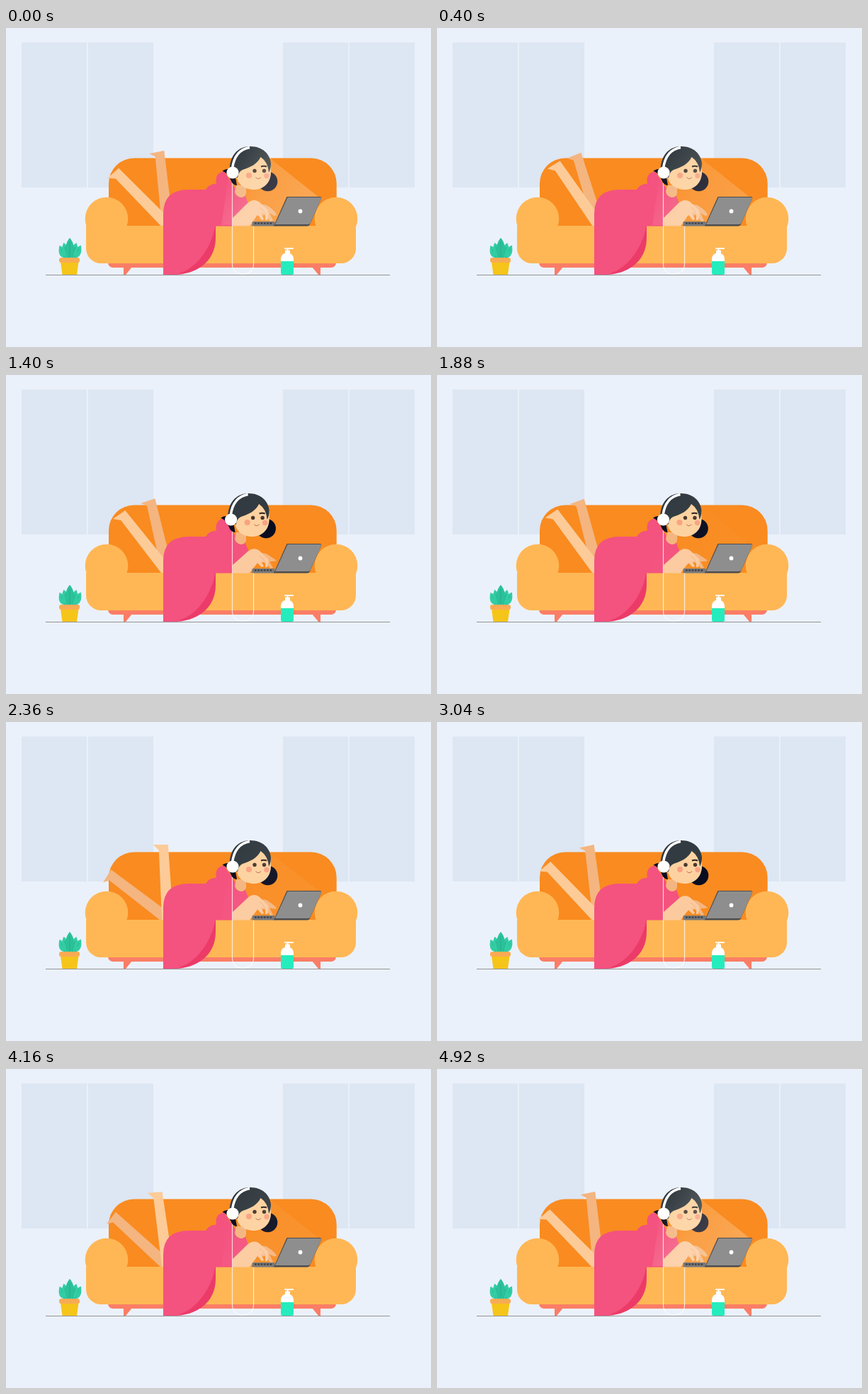
An HTML page with a canvas for the animation above (5000 ms loop, 600 by 450 pixels).

```html
<!DOCTYPE html>
<html lang="en">
<head>
<meta charset="utf-8">
<title>Sofa</title>
<style>
html, body { margin: 0; width: 100%; height: 100%; overflow: hidden; background: #ebf1fa; }
canvas { display: block; width: 600px; height: 450px; }
</style>
</head>
<body>
<canvas id="stage" width="600" height="450"></canvas>
<script>
const ctx = document.getElementById('stage').getContext('2d');
const LOOP = 5000, STEP = 40, LAST = 4920;

const PINK = '#f4527f', SKIN = '#fcca9f', SKIN_DARK = '#f4b580', FACE = '#fdd2a0';
const HAIR = '#323b41', NAVY = '#0a0d20', SEAT = '#ffb755';

function shape(d, color) {
  ctx.fillStyle = color;
  ctx.fill(new Path2D(d));
}
function line(d, color, width) {
  ctx.strokeStyle = color;
  ctx.lineWidth = width;
  ctx.stroke(new Path2D(d));
}
function disc(x, y, r, color) {
  ctx.fillStyle = color;
  ctx.beginPath();
  ctx.arc(x, y, r, 0, Math.PI * 2);
  ctx.fill();
}
function box(x, y, w, h, color, r = 0) {
  ctx.fillStyle = color;
  ctx.beginPath();
  ctx.roundRect(x, y, w, h, r);
  ctx.fill();
}
function at(x, y, degrees, draw) {
  ctx.save();
  ctx.translate(x, y);
  ctx.rotate(degrees * Math.PI / 180);
  draw();
  ctx.restore();
}

const mix = (a, b, k) => a + (b - a) * k;
const ease = k => (1 - Math.cos(Math.PI * k)) / 2;

// Eased interpolation through [time, value] keys.
function track(keys, t) {
  const i = Math.max(1, keys.findIndex(key => key[0] > t));
  const [t0, v0] = keys[i - 1], [t1, v1] = keys[i];
  return mix(v0, v1, ease((t - t0) / (t1 - t0)));
}

// The moments at which the legs turn round.
const swing = [-630, 130, 880, 1626, 2407, 3190, 3988, 4789, 5560]
  .map((time, i) => [time, i % 2 ? 0 : 1]);
const glowKeys = [[0, 1], [840, .45], [1400, 0], [2360, .22], [3040, 0], [4160, .28], [4920, 1], [5000, 1]];
const nodKeys = [[0, 0], [880, 0], [1440, 1], [2080, 0], [5000, 0]];

function room() {
  box(0, 0, 600, 450, '#ebf1fa');
  for (const x of [22, 391]) {
    box(x, 20.5, 186, 204.5, '#dde6f3');
    box(x + 92.3, 20, 1.3, 205, '#f1f5fb');
  }
}

function plant() {
  const leaves = [[84, -25, 20, 7], [96, 28, 21, 7], [87, -14, 23, 7], [93, 16, 23, 7], [90, 0, 29, 8]];
  for (const [x, angle, length, width] of leaves) {
    at(x, 325, angle, () => {
      shape(`M0 0C${-width} -5 ${-width} ${9 - length} 0 ${-length}C${width} ${9 - length} ${width} -5 0 0Z`,
        angle ? '#33cda4' : '#2cc199');
      line(`M0 0V${6 - length}`, '#1ba583', .6);
    });
  }
  shape('M77 330H102.500L100 348H79.500Z', '#f5c519');
  box(75, 324, 29, 7, '#f9ab54', 3);
}

function bottle() {
  box(388, 317.500, 18, 30.500, '#fff', [8, 8, 2.500, 2.500]);
  box(388, 329, 18, 19, '#25ecbd', [0, 0, 2.500, 2.500]);
  box(394, 313.500, 7, 5, '#fff', 1);
  box(396.500, 310, 2, 5, '#fff');
  box(393, 310, 13, 2, '#fff', 1);
}

function sofaFront() {
  box(144, 328, 322, 10, '#fb7d66', [0, 0, 7, 7]);
  shape('M166 337H178L169 348H166Z', '#fb7d66');
  shape('M432 337H444V348H441Z', '#fb7d66');
  disc(142, 269, 30.300, SEAT);
  disc(466, 269, 30.300, SEAT);
  box(113, 279, 381, 53, SEAT, [0, 0, 21, 21]);
}

function leg(angle, toe, color) {
  at(227, 278, angle - 91.1, () =>
    shape(`M2 -105L-19 ${toe}L-11 -97L-7 -1L-5 12H10L6 -46Z`, color));
}

function dress() {
  shape('M260 279H296V296C296 330 268 348 237 348Z', '#ec3b68');
  shape('M222 348V262Q222 228 258 228H282Q286 220 297 219.500Q294 205 308 202L327 232L338 237L343 250L320 269V279.500H295.500C290 310 268 343 237 348Z', PINK);
}

function arms(lift) {
  const drop = 2.5 - 2.5 * lift;
  shape('M325 222H339V233Q338 239 331 239Q324 237 323 231Z', SKIN_DARK);
  // far hand
  shape(`M352 ${252 + drop}Q364 ${246 + drop} 371 ${252 + drop}Q380 ${258 + drop} 382 ${264 - drop}L379 ${265 - drop}L372 ${261 + drop}L377 272L373 273L366 264L352 265Z`, SKIN_DARK);
  // near arm and hand
  const top = 241 + drop;
  shape(`M320 279.500V268L341 ${top + 6}Q349 ${top - 1} 357 ${top + 4}L369 ${top + 15}Q372 ${top + 19} 369 271L366 271V${top + 22}L360 ${top + 19}L364 270L361 271L355 ${top + 22}Q351 270 344 279.500Z`, SKIN);
  line(`M358 ${top + 12}Q364 ${top + 15} 366 ${top + 23}`, '#efad7b', .8);
}

function head(dx) {
  ctx.save();
  ctx.translate(dx, 0);
  disc(369.500, 216.500, 13.800, NAVY);
  shape('M305.500 201.500Q312 197 322 200L326 222Q320 222 317 214Q313 205 305.500 201.500Z', NAVY);
  shape('M325 191C330 180 345 176 359 179L374 191V203C374 219 363 228 350 228C335 228 325 219 325 204Z', FACE);
  shape('M316 210C313 186 323 167 345 167C362 167 373 178 374 191Q374 199 371 204Q370 189 359.500 182C355 192 344 197 334 200Q328 203 327 211Z', HAIR);
  line('M360 195.500Q364 194 368 195.500', '#29221f', 1.9);
  disc(351, 201.500, 2.700, '#48372f');
  disc(364.500, 201.500, 2.700, '#48372f');
  disc(343, 208, 4, '#f9a283');
  disc(368, 208.500, 3.700, '#f9a283');
  line('M352.500 210.500Q356 215 360 210.500', '#bd6b50', 1);
  line('M319.500 198Q323 172 344 168.500', '#fff', 3.5);
  disc(320, 204, 8.600, '#fff');
  ctx.restore();
}

function glow(level) {
  const light = ctx.createLinearGradient(412, 258, 314, 196);
  const tint = alpha => `rgba(255,244,228,${alpha * level})`;
  light.addColorStop(0, tint(.26));
  light.addColorStop(.5, tint(.19));
  light.addColorStop(1, tint(0));
  shape('M442 239L378 188Q362 167 345 167Q320 169 316 195L304 278H378L396 239Z', light);
}

function laptop() {
  box(347.500, 273, 32, 6.500, '#77787b', 1);
  for (let i = 0; i < 6; i++) box(351 + i * 4.3, 274.5, 2.6, 2, '#36383d');
  shape('M396.500 238H443Q446 238 445 241L429 277Q428 279.500 425 279.500H378Z', '#4b4c50');
  shape('M397.500 239H443.500Q446 239 445 241L429.500 275.500Q428.500 277 426 277H380Z', '#8e8e8e');
  disc(415.500, 258.500, 2.900, '#fff');
}

function render(t) {
  const sway = track(swing, t);
  room();
  line('M56 348.500H542', '#929397', 1.1);
  plant();
  box(145, 183.4, 321.7, 130, '#f98b20', [36, 36, 0, 0]);
  leg(mix(91.5, 41.1, sway), -102, SKIN_DARK);
  leg(mix(46.6, 91.4, sway), -105, '#fccb98');
  sofaFront();
  dress();
  arms((1 + Math.cos(t / 410 * Math.PI * 2)) / 2);
  line('M319.500 210V334Q320 346 334.500 347.500Q349 346 349.500 334V279', 'rgba(255,255,255,.75)', 1.2);
  head(-2.4 * track(nodKeys, t));
  glow(track(glowKeys, t));
  laptop();
  bottle();
}

function tick(now) {
  const t = Math.floor(now % LOOP / STEP) * STEP;
  render(Math.min(t, LAST));
  requestAnimationFrame(tick);
}
tick(performance.now());
</script>
</body>
</html>
```
